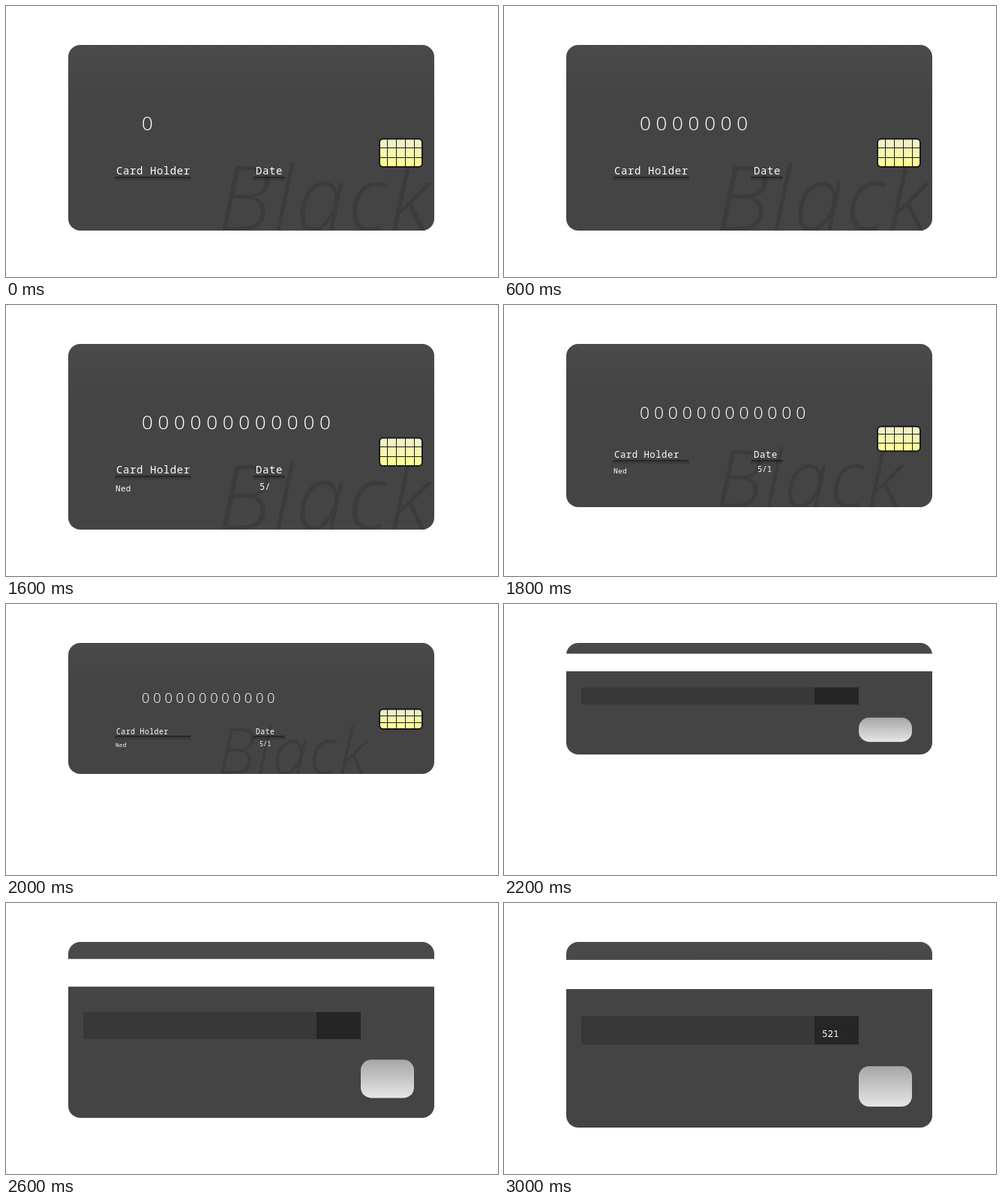
These frames come from a looping animation (656 px wide and 362 px high, 3100 ms). An HTML page:

```html
<!DOCTYPE html>
<html lang="en">
<head>
<meta charset="utf-8">
<title>Card</title>
<style>
  html, body { margin: 0; width: 100%; height: 100%; overflow: hidden; background: #fff; }
  svg { display: block; width: 656px; height: 362px; }
  text { fill: #fff; font-family: "Noto Sans Mono", monospace; white-space: pre; }
  .label { font-size: 14px; font-weight: 300; letter-spacing: .58px; }
  .number { font: 300 26px "Open Sans", sans-serif; letter-spacing: 6.7px; }
  .mark { font: italic 300 120px "Open Sans", sans-serif; letter-spacing: 3px; fill: #3c3c3c; }
  .small { font-size: 11px; font-weight: 300; letter-spacing: .3px; }
  .date { font-size: 12px; font-weight: 500; }
  .code { font-size: 12.5px; }
</style>
</head>
<body>
<svg id="stage" viewBox="0 0 656 362">
  <defs>
    <linearGradient id="card" x2="0" y2="1">
      <stop offset="0" stop-color="#4a4a4a"/><stop offset=".3" stop-color="#444"/>
    </linearGradient>
    <linearGradient id="gold" x2="0" y2="1">
      <stop offset="0" stop-color="#eeeed0"/><stop offset="1" stop-color="#ffff8c"/>
    </linearGradient>
    <linearGradient id="silver" x2="0" y2="1">
      <stop offset="0" stop-color="#a6a6a6"/><stop offset="1" stop-color="#e6e6e6"/>
    </linearGradient>
    <linearGradient id="shade" x2="0" y2="1">
      <stop offset="0" stop-color="#000" stop-opacity=".3"/><stop offset="1" stop-color="#000" stop-opacity="0"/>
    </linearGradient>
    <clipPath id="edge"><rect id="edgeBox" x="83" y="52" width="488" rx="16"/></clipPath>
  </defs>
</svg>
<script>
const TOP = 52, LEFT = 83, WIDTH = 488, HEIGHT = 248, MIN = 149;
const LOOP = 3100, STEP = 100, RATE = 21.5;
const NUMBER = "0".repeat(12), NAME = "Ned", DATE = "5/1", CODE = "521";

const stage = document.getElementById("stage");
const edgeBox = document.getElementById("edgeBox");
const updates = [];

function add(parent, tag, attrs) {
  const el = document.createElementNS("http://www.w3.org/2000/svg", tag);
  for (const key in attrs) el.setAttribute(key, attrs[key]);
  return parent.appendChild(el);
}

// Boxes keep their width while their vertical extent follows the card scale.
function box(parent, x, y, w, h, fill, extra = {}) {
  const el = add(parent, "rect", { x, width: w, fill, ...extra });
  updates.push(s => {
    el.setAttribute("y", TOP + (y - TOP) * s);
    el.setAttribute("height", h * s);
  });
}

// Lines and shadows keep their thickness.
function rule(parent, x, y, w, h, fill) {
  const el = add(parent, "rect", { x, width: w, height: h, fill });
  updates.push(s => el.setAttribute("y", Math.round(TOP + (y - TOP) * s)));
}

// Text scales evenly from its left end.
function label(parent, cls, x, y, content = "") {
  const el = add(parent, "text", { class: cls, y: y - TOP });
  el.textContent = content;
  updates.push(s => el.setAttribute("transform", `translate(${x} ${TOP}) scale(${s})`));
  return el;
}

function side() {
  const g = add(stage, "g", { "clip-path": "url(#edge)" });
  box(g, LEFT, TOP, WIDTH, HEIGHT, "url(#card)");
  return g;
}

const front = side();
label(front, "mark", 282, 300, "Black");
for (const [x, w] of [[146, 100], [330, 41]]) {
  rule(front, x, 228, w, 1, "#1c1c1c");
  rule(front, x - 1, 229, w + 2, 5, "url(#shade)");
}
label(front, "label", 147, 225, "Card Holder");
label(front, "label", 333, 225, "Date");
const number = label(front, "number", 181, 166);
const name = label(front, "small", 146, 249);
const date = label(front, "date", 338, 247);
box(front, 498, 177.5, 57, 37.5, "url(#gold)", { rx: 5, stroke: "#1a1a1a", "stroke-width": 2 });
for (let i = 0; i < 4; i++) box(front, 508 + 12 * i, 178, 1, 37, "#1a1a1a");
for (const y of [189, 202]) rule(front, 498, y, 57, 1, "#1a1a1a");

const back = side();
box(back, LEFT, 76, WIDTH, 39, "#fff");
box(back, 103, 151, 311, 38, "#383838");
box(back, 414, 151, 59, 38, "#262626");
box(back, 473, 218, 71, 54, "url(#silver)", { rx: 14 });
const code = label(back, "code", 424, 179);

const typed = (text, step, start) => text.slice(0, Math.max(0, step - start + 1));

function cardHeight(step) {
  const h = step < 22 ? 218 - RATE * (step - 18) : MIN + RATE * (step - 22);
  return step < 17 ? HEIGHT : Math.min(HEIGHT, Math.round(h));
}

function draw() {
  const step = Math.floor(performance.now() % LOOP / STEP);
  const h = cardHeight(step);
  number.textContent = typed(NUMBER, step, 0);
  name.textContent = typed(NAME, step, 12);
  date.textContent = typed(DATE, step, 15);
  code.textContent = typed(CODE, step, 28);
  edgeBox.setAttribute("height", h);
  front.style.display = step < 22 ? "" : "none";
  back.style.display = step < 22 ? "none" : "";
  for (const update of updates) update(h / HEIGHT);
  requestAnimationFrame(draw);
}
draw();
</script>
</body>
</html>
```
